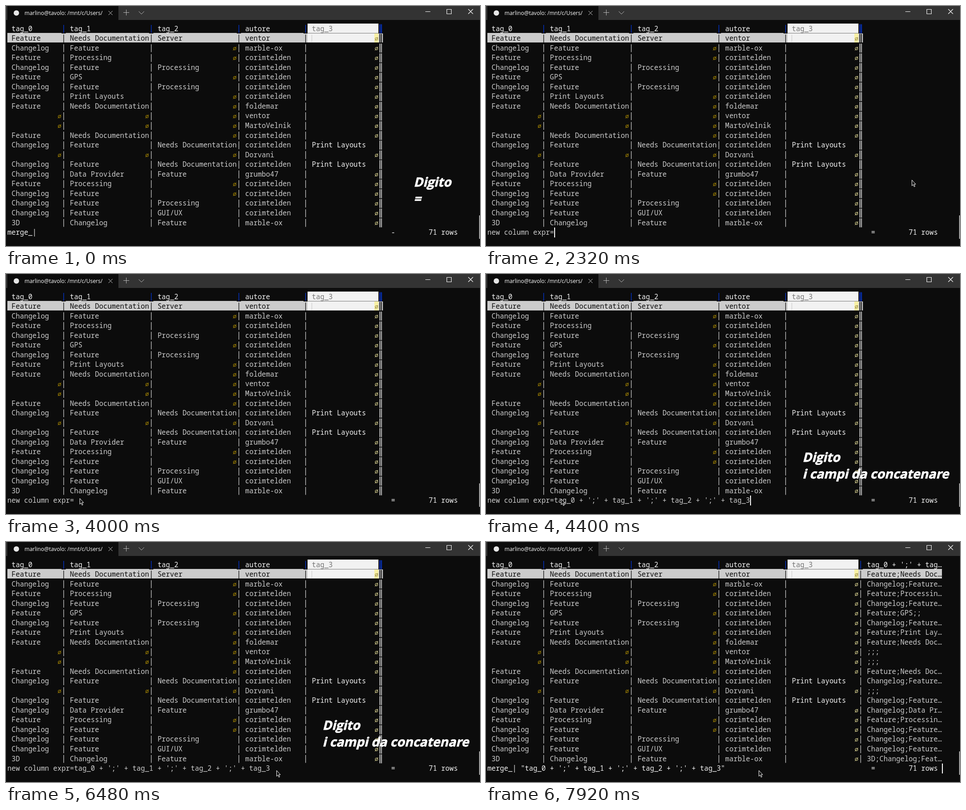
Recreate the animation shown at these times as an HTML page. Size 1050 by 533 pixels, loop 8 s.

```html
<!DOCTYPE html>
<html lang="it">
<head>
<meta charset="utf-8">
<title>Terminal table</title>
<style>
  html, body { margin: 0; width: 100%; height: 100%; overflow: hidden; background: #0c0c0c; }
  svg { display: block; width: 100%; height: 100%; }
  text { white-space: pre; }
  rect { shape-rendering: crispEdges; }
  .mono { font: 500 15.4px "Noto Sans Mono", "DejaVu Sans Mono", monospace; }
  .title { font: 12px "Open Sans", "Noto Sans", sans-serif; }
  .caption { font: 700 28px "Open Sans", "Noto Sans", sans-serif;
    fill: #fff; stroke: #fff; stroke-width: .8px; }
</style>
</head>
<body>
<svg id="stage" viewBox="0 0 1050 533"></svg>
<script>
const LOOP = 8000, STEP = 40, BLINK = 1064;
const X0 = 3, Y0 = 39.5, CW = 9.24, RH = 21.55;
const BG = '#0c0c0c', DIM = '#cccccc', BRIGHT = '#f2f2f2', GREY = '#767676';
const BLUE = '#0037da', GOLD = '#c19c00', PALE = '#f9f1a5';
const EXPR = "tag_0 + ';' + tag_1 + ';' + tag_2 + ';' + tag_3";

// each field: first text column and the column of the separator after it
let next = 1;
const FIELDS = Object.entries({ tag_0: 12, tag_1: 19, tag_2: 19, autore: 14, tag_3: 16 })
  .map(([name, width]) => {
    const start = next, bar = start + width;
    next = bar + 2;
    return { name, start, bar };
  });
const INNER = FIELDS.slice(0, 4), ACTIVE = FIELDS[4];

const ROWS = `Feature|Needs Documentation|Server|ventor|
Changelog|Feature||marble-ox|
Feature|Processing||corimtelden|
Changelog|Feature|Processing|corimtelden|
Feature|GPS||corimtelden|
Changelog|Feature|Processing|corimtelden|
Feature|Print Layouts||corimtelden|
Feature|Needs Documentation||foldemar|
|||ventor|
|||MartoVelnik|
Feature|Needs Documentation||corimtelden|
Changelog|Feature|Needs Documentation|corimtelden|Print Layouts
|||Dorvani|
Changelog|Feature|Needs Documentation|corimtelden|Print Layouts
Changelog|Data Provider|Feature|grumbo47|
Feature|Processing||corimtelden|
Changelog|Feature||corimtelden|
Changelog|Feature|Processing|corimtelden|
Changelog|Feature|GUI/UX|corimtelden|
3D|Changelog|Feature|marble-ox|`.split('\n').map(line => line.split('|'));

const stage = document.getElementById('stage');
const colX = c => X0 + c * CW;
const rowY = r => Y0 + r * RH;

function add(parent, tag, attrs, content) {
  const el = document.createElementNS('http://www.w3.org/2000/svg', tag);
  for (const key in attrs) el.setAttribute(key, attrs[key]);
  if (content !== undefined) el.textContent = content;
  parent.appendChild(el);
  return el;
}
const group = () => add(stage, 'g', {});
const rect = (p, x, y, width, height, fill) => add(p, 'rect', { x, y, width, height, fill });
const stroke = (p, d, color, width = 1) =>
  add(p, 'path', { d, fill: 'none', stroke: color, 'stroke-width': width });
const write = (p, col, row, text, fill) =>
  add(p, 'text', { class: 'mono', x: colX(col), y: rowY(row) + 16, fill }, text);
const show = (el, on) => el.setAttribute('visibility', on ? 'visible' : 'hidden');
const underline = (p, from, to, color) => stroke(p, `M${colX(from)} 60.4H${colX(to)}`, color);

function bar(p, col, row, color) {
  stroke(p, `M${colX(col + 0.5)} ${rowY(row) + 2.5}v17.5`, color, 1.3);
}

function doubleBar(p, col, row, color) {
  const x = colX(col + 0.5), y = rowY(row) + 1;
  stroke(p, `M${x - 1.7} ${y}v20M${x + 1.7} ${y}v20`, color, 1.9);
}

function nullMark(p, col, row, color) {
  const x = colX(col + 0.5), y = rowY(row) + 12;
  stroke(p, `M${x - 3} ${y}a3 3 0 1 0 6 0a3 3 0 1 0 -6 0M${x - 3.5} ${y + 4}l7 -8`, color);
}

function drawWindow() {
  const g = group();
  rect(g, 0, 0, 1050, 533, BG);
  rect(g, 0, 0, 1050, 31, '#333333');
  rect(g, 3, 0, 246, 31, BG);
  add(g, 'circle', { cx: 23, cy: 15.5, r: 6, fill: '#e6e6e6' });
  add(g, 'text', { class: 'title', x: 41, y: 19.5, fill: '#fff' }, 'marlino@tavolo: /mnt/c/Users/');
  stroke(g, 'M227 11l9 9m0 -9l-9 9', '#d0d0d0');
  stroke(g, 'M260 14.5h13m-6.5 -6.5v13', '#b8b8b8');
  stroke(g, 'M294 12l6 6l6 -6', '#b8b8b8');
  stroke(g, 'M929 12.5h11M976.5 7.5h10v10h-10zM1024 7l10.5 10.5m0 -10.5l-10.5 10.5', '#fff', 1.1);
  rect(g, 1048, 465, 2, 52, '#a6a6a6');
}

function drawTable() {
  const g = group();
  rect(g, X0, 61, 832, 20, DIM);
  rect(g, 668, 39, 157, 42, BRIGHT);
  rect(g, 816, 61, 9, 20, PALE);
  stroke(g, `M${colX(ACTIVE.start)} 64v16`, '#c8c8c8');
  for (const f of FIELDS) {
    const ink = f === ACTIVE ? GREY : BRIGHT;
    write(g, f.start, 0, f.name, ink);
    underline(g, f.start - 1, f.bar, ink);
  }
  INNER.forEach(f => bar(g, f.bar, 0, BLUE));
  ROWS.forEach((cells, i) => {
    const row = i + 1, ink = i ? DIM : BG;
    INNER.forEach(f => bar(g, f.bar, row, ink));
    cells.forEach((cell, j) => {
      const f = FIELDS[j], last = f === ACTIVE;
      if (cell) write(g, f.start, row, cell, last ? BRIGHT : ink);
      else nullMark(g, f.bar - 1, row, !last ? GOLD : i ? PALE : '#8a7d3a');
    });
  });
  write(g, 101, 21, '71 rows', BRIGHT);
}

function drawEdge() {
  const g = group();
  doubleBar(g, ACTIVE.bar, 0, BLUE);
  ROWS.forEach((_, i) => doubleBar(g, ACTIVE.bar, i + 1, i ? DIM : BG));
  return g;
}

function drawExtra() {
  const g = group(), col = ACTIVE.bar + 2;
  const clip = s => s.length > 18 ? s.slice(0, 17) + '…' : s;
  rect(g, 830, 61, 180, 20, DIM);
  bar(g, ACTIVE.bar, 0, BLUE);
  write(g, col, 0, clip(EXPR), BRIGHT);
  underline(g, col - 1, col + 18, BRIGHT);
  ROWS.forEach((cells, i) => {
    const ink = i ? DIM : BG;
    const joined = cells.filter((_, j) => j !== 3).join(';');
    bar(g, ACTIVE.bar, i + 1, ink);
    write(g, col, i + 1, clip(joined), ink);
  });
  return g;
}

function drawCaption(x, y, lines) {
  const g = group();
  lines.forEach((line, i) => add(g, 'text',
    { class: 'caption', transform: `translate(${x} ${y + i * 37.5}) skewX(-14)` }, line));
  return g;
}

drawWindow();
drawTable();
const edge = drawEdge();
const extra = drawExtra();
const prompt = write(stage, 0, 21, '', DIM);
const keyMark = write(stage, 92, 21, '', BRIGHT);
const caret = rect(stage, 0, 0, 2, 21.5, '#fff');
const captions = [
  { el: drawCaption(903, 400.5, ['Digito', '=']), from: -80, to: 1360 },
  { el: drawCaption(701, 416.5, ['Digito', 'i campi da concatenare']), from: 4160, to: 7280 }
];
const mouse = add(stage, 'path', {
  d: 'M.5 .5V13.2L3.4 10.5L5.4 15.4L7.3 14.6L5.3 9.8H9Z',
  fill: BG, stroke: '#fff', 'stroke-width': 1
});

// key points of the pointer path: time, x, y
const PATH = [
  [280, 933, 510], [520, 943, 386], [2960, 943, 386], [3080, 457, 395], [3320, 157, 453],
  [3480, 130, 470], [3800, 161, 497], [5040, 171, 501], [5400, 377, 503],
  [5880, 557, 506], [6600, 607, 507], [6800, 604, 507]
];
// blink: when the caret first lights up in that state
const STATES = [
  { at: 0, text: 'merge_|', ink: BRIGHT, mark: '-', blink: 760, col: 109, row: 20 },
  { at: 2320, text: 'new column expr=', ink: DIM, mark: '=', blink: 2320, col: 16, row: 21 },
  { at: 4400, text: 'new column expr=' + EXPR, ink: DIM, mark: '=', blink: 4400, col: 63, row: 21 },
  { at: 7920, text: `merge_| "${EXPR}"`, ink: BRIGHT, mark: '=', blink: 7920, col: 109, row: 21 }
];

function pointerAt(t) {
  const i = PATH.findIndex(p => p[0] > t);
  if (i < 0) return PATH[PATH.length - 1].slice(1);
  if (i === 0) return null;
  const [t0, x0, y0] = PATH[i - 1], [t1, x1, y1] = PATH[i];
  const k = (t - t0) / (t1 - t0);
  return [Math.round(x0 + (x1 - x0) * k), Math.round(y0 + (y1 - y0) * k)];
}

function render(t) {
  const state = STATES.filter(s => s.at <= t).pop();
  prompt.textContent = state.text;
  prompt.setAttribute('fill', state.ink);
  keyMark.textContent = state.mark;

  const done = state === STATES[3];
  show(edge, !done);
  show(extra, done);

  show(caret, t >= state.blink && (t - state.blink) % BLINK < BLINK / 2);
  caret.setAttribute('x', colX(state.col));
  caret.setAttribute('y', rowY(state.row));

  for (const { el, from, to } of captions) {
    const fade = Math.min((t - from + STEP) / 120, (to - t) / 120);
    el.setAttribute('opacity', t < from ? 0 : Math.max(0, Math.min(1, fade)));
  }

  const spot = pointerAt(t);
  show(mouse, spot);
  if (spot) mouse.setAttribute('transform', `translate(${spot})`);
}

function tick() {
  const t = performance.now() % LOOP;
  render(Math.floor(t / STEP) * STEP);
  requestAnimationFrame(tick);
}
tick();
</script>
</body>
</html>
```
